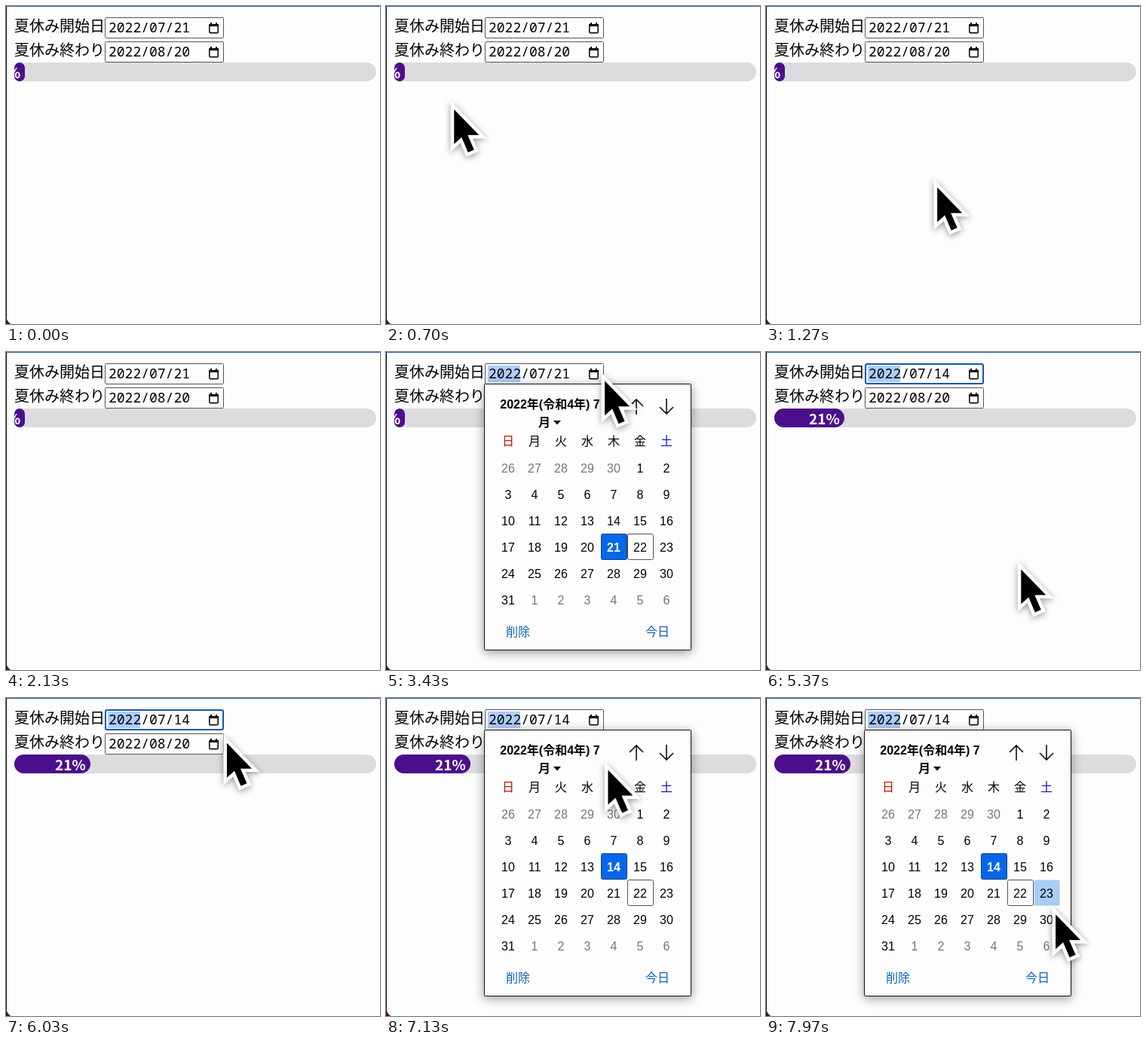
An HTML page for the animation above (8000 ms loop, 496 px wide and 422 px high).

```html
<!DOCTYPE html>
<html lang="ja">
<meta charset="utf-8">
<style>
html, body { margin: 0; width: 100%; height: 100%; overflow: hidden; background: #fdfdfe; }
svg { position: absolute; left: 0; top: 0; }
.bar { position: absolute; left: 11px; top: 75px; width: 480px; height: 25px; border-radius: 12.5px; background: #dcdcde; }
#fill { position: relative; height: 25px; border-radius: 12.5px; background: #4b0f8c; overflow: hidden; }
#pct { position: absolute; right: 6px; top: 0; font: bold 19px/26px "Noto Sans CJK JP", "Noto Sans CJK", sans-serif; color: #fff; white-space: nowrap; }
text { font: 16px "Liberation Sans", "Noto Sans CJK JP", "Noto Sans CJK", sans-serif; }
.label { font: 500 20px "Noto Sans CJK JP", "Noto Sans CJK", sans-serif; }
.date { font: 500 18px "Noto Sans Mono", monospace; }
.mid { text-anchor: middle; }
.bold { font-weight: bold; }
.link { fill: #0a62ba; }
.icon { fill: none; stroke: #111; stroke-width: 1.6; }
#pop { filter: drop-shadow(0 3px 7px rgba(0, 0, 0, .4)); }
#cursor { filter: drop-shadow(0 2px 4px rgba(0, 0, 0, .4)); }
</style>
<body>
<div class="bar"><div id="fill"><span id="pct"></span></div></div>
<svg width="496" height="422">
  <defs>
    <g id="cal">
      <rect class="icon" x="269.800" y="24.800" width="11.400" height="10.800" rx="1"/>
      <path d="M269 24h13v3h-13zM271 22h2v3h-2zM278 22h2v3h-2z"/>
    </g>
  </defs>
  <path d="M.5 0V422" stroke="#000"/>
  <path d="M0 .5H496" stroke="#2c5f9a"/>
  <path d="M0 410Q1 420 7 422H0z" fill="#43160a"/>

  <text class="label" x="11" y="34">夏休み開始日</text>
  <text class="label" x="11" y="66">夏休み終わり</text>
  <rect id="field" fill="#fdfdfe"/>
  <rect id="year" x="135" y="18" width="43" height="22" fill="#accdf8"/>
  <text class="date" id="start" x="136" y="34.500"></text>
  <use href="#cal"/>
  <rect x="131.500" y="47.500" width="157" height="27" rx="1" fill="#fdfdfe" stroke="#555"/>
  <text class="date" x="136" y="66.500">2022/08/20</text>
  <use href="#cal" y="32"/>

  <g id="pop">
    <rect x="130.500" y="42.500" width="274" height="353" rx="1" fill="#fdfdfe" stroke="#111"/>
    <text class="mid bold" x="217.500" y="75">2022年(令和4年) 7</text>
    <text class="bold" x="202" y="99">月</text>
    <path d="M222 91h10l-5 5.500z"/>
    <path class="icon" d="M332 83V63M323 72l9-9 9 9M372 62v20M363 73l9 9 9-9"/>
    <g id="grid"></g>
    <text class="link" x="159" y="377">削除</text>
    <text class="link" x="344" y="377">今日</text>
  </g>
  <path id="cursor" d="M0 0V46L10 37 18.500 57 26.500 53.500 18 34H33z" stroke="#fff" stroke-width="9" paint-order="stroke"/>
</svg>
<script>
const LOOP = 8000, CELL = 35, LEFT = 145, TOP = 136;
const OPEN = 2870, PICK = 4560, GROW = 4640, REOPEN = 6500, HOVER_LAG = 60;
const $ = id => document.getElementById(id);

// Pointer waypoints: time, x, y
const path = [
  [370, -45, 60], [700, 90, 137], [1200, 210, 235], [1600, 300, 260], [2000, 330, 450],
  [2160, 350, 450], [2500, 310, 190], [2840, 276, 32], [3130, 276, 32], [3430, 290, 38],
  [3900, 328, 150], [4250, 316, 222], [4480, 305, 225], [4560, 305, 225], [4600, 312, 226],
  [5000, 340, 285], [5300, 340, 300], [5620, 320, 215], [6030, 293, 60], [6400, 276, 30],
  [6750, 276, 30], [7200, 300, 110], [7600, 345, 190], [7900, 378, 266], [7970, 384, 287],
  [8000, 386, 294]
];

function el(tag, attrs, text = '') {
  const e = document.createElementNS('http://www.w3.org/2000/svg', tag);
  for (const k in attrs) e.setAttribute(k, attrs[k]);
  e.textContent = text;
  return $('grid').appendChild(e);
}

[...'日月火水木金土'].forEach((name, i) => el('text', {
  class: 'mid', x: 162 + i * CELL, y: 124, fill: i == 0 ? '#c41200' : i == 6 ? '#1010c8' : '#000'
}, name));

const cells = Array.from({ length: 42 }, (_, i) => {
  const x = LEFT + i % 7 * CELL, y = TOP + Math.floor(i / 7) * CELL, day = i - 4;
  const inMonth = day > 0 && day < 32;
  const box = el('rect', { x: x + .5, y: y + .5, width: 34, height: 34, rx: 2 });
  const num = el('text', { class: 'mid', x: x + 17, y: y + 24 },
    inMonth ? day : day < 1 ? day + 30 : day - 31);
  return { x, y, day, box, num, ink: inMonth ? '#000' : '#757575' };
});

function slope(i, k) {
  const a = path[i - 1], b = path[i], c = path[i + 1];
  if (!a || !c || a[k] == b[k] || b[k] == c[k]) return 0;
  return (c[k] - a[k]) / (c[0] - a[0]);
}

function pointer(t) {
  if (t <= path[0][0]) return [-90, 0];
  const i = path.findIndex(p => p[0] >= t) - 1;
  const a = path[i], b = path[i + 1], d = b[0] - a[0], u = (t - a[0]) / d, v = 1 - u;
  return [1, 2].map(k => a[k] * v * v * (1 + 2 * u) + b[k] * u * u * (3 - 2 * u)
    + d * u * v * (slope(i, k) * v - slope(i + 1, k) * u));
}

function drawCells(t, selected) {
  const [px, py] = pointer(t - HOVER_LAG);
  for (const c of cells) {
    const on = c.day == selected;
    const hover = px >= c.x && px < c.x + CELL && py >= c.y && py < c.y + CELL;
    c.box.setAttribute('fill', on ? '#0567ea' : hover ? '#a9cdf4' : 'none');
    c.box.setAttribute('stroke', on ? '#123f78' : c.day == 22 ? '#555' : 'none');
    c.num.setAttribute('fill', on ? '#fff' : c.ink);
    c.num.style.fontWeight = on ? 'bold' : 'normal';
  }
}

function draw(t) {
  const open = t >= OPEN && t < PICK || t >= REOPEN;
  const ring = t >= OPEN && !open;
  const selected = t < PICK ? 21 : 14;
  const p = Math.min(1, Math.max(0, (t - GROW) / 900));

  $('fill').style.width = 3 + 18 * p * p * (3 - 2 * p) + '%';
  $('pct').textContent = t < GROW ? '3%' : '21%';
  $('start').textContent = '2022/07/' + selected;
  $('year').style.display = t >= OPEN ? '' : 'none';
  const frame = ring
    ? { x: 132, y: 16, width: 156, height: 26, rx: 2, stroke: '#1157ab', 'stroke-width': 2 }
    : { x: 131.5, y: 15.5, width: 157, height: 27, rx: 1, stroke: '#555', 'stroke-width': 1 };
  for (const k in frame) $('field').setAttribute(k, frame[k]);
  $('pop').style.display = open ? '' : 'none';
  if (open) drawCells(t, selected);
  $('cursor').setAttribute('transform', `translate(${pointer(t)})`);
}

const begin = performance.now();
function tick() {
  draw((performance.now() - begin) % LOOP);
  requestAnimationFrame(tick);
}
tick();
</script>
</body>
</html>
```
